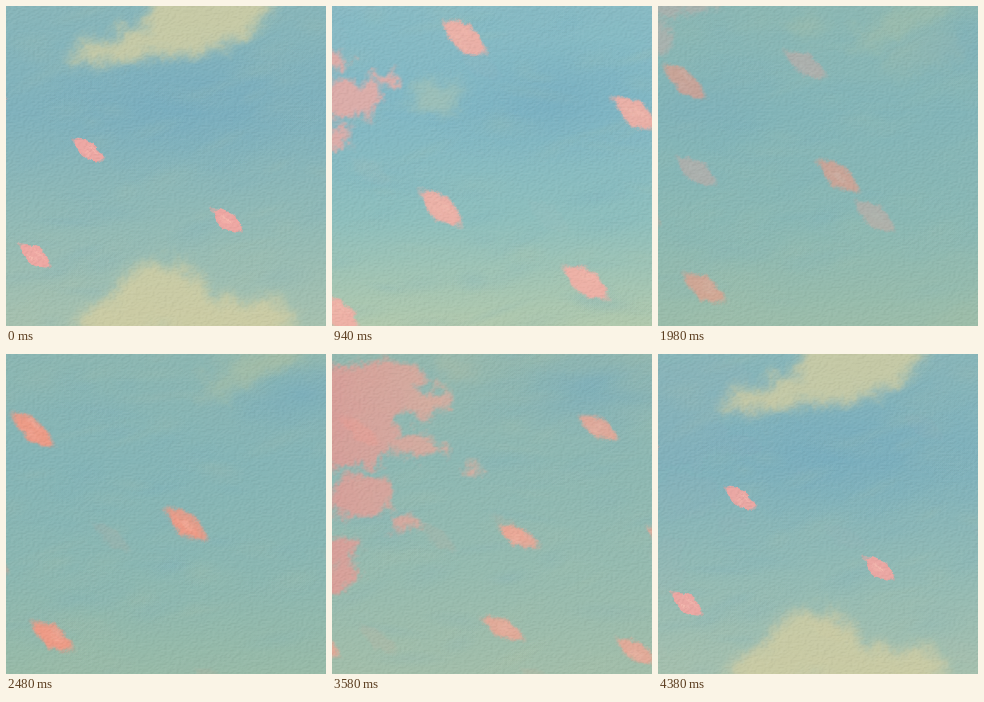
Recreate the animation shown at these times as an HTML page with a canvas. Size 320 by 320 pixels, loop 4440 ms.

```html
<!DOCTYPE html>
<html lang="en">
<head>
<meta charset="utf-8">
<title>Drifting petals</title>
<style>
html, body { margin: 0; width: 100%; height: 100%; overflow: hidden; background: #84b5bd; }
canvas { display: block; width: 100vw; height: 100vh; }
</style>
</head>
<body>
<canvas id="stage" width="320" height="320"></canvas>
<script>
const SIZE = 320, HOLD = 200, STEP = 60, STEPS = 10;
const SEGMENT = HOLD + (STEPS - 1) * STEP;
const BLUE = '#74abc1', CREAM = '#b0c3a6';

// Spots are [x, y, radius], petals are [x, y] centres.
const scenes = [
  {
    sky: ['#88b6ba', '#80b2bd', '#91bab6', '#a6c1af'],
    deep: [185, 92, 75],
    cloud: '#d2cea3',
    puffs: [[200, 4, 36], [172, 32, 20], [128, 39, 16], [90, 50, 13], [155, 284, 25], [118, 312, 24], [195, 312, 26], [250, 314, 22]],
    petal: '#f3a6a2', length: 39, plump: .46, tilt: 35, soft: .7,
    petals: [[82, 144], [221, 214], [28, 249], [-16, 84]]
  },
  {
    sky: ['#88bcc5', '#83b9c6', '#8fc0be', '#b2caae'],
    deep: [220, 95, 65],
    cloud: '#a1c2b7',
    puffs: [[106, 92, 16]],
    blossom: ['#f0aaa4', '#f1b0a9'],
    blots: [[14, 95, 20], [-6, 54, 13], [5, 133, 10], [54, 75, 7]],
    petal: '#f4b0a6', length: 56, plump: .47, tilt: 36, soft: 1.3,
    petals: [[132, 31], [303, 107], [109, 202], [254, 276], [6, 307]]
  },
  {
    sky: ['#8cbab6', '#82b7bb', '#8abab8', '#a3c2ae'],
    deep: [45, 100, 50],
    cloud: '#a9c2a8',
    puffs: [[250, 52, 15], [280, 42, 18], [150, 20, 12], [305, 316, 19]],
    blossom: ['#eda9a3', '#e6afa8'],
    blots: [[4, 1, 14], [42, -5, 15], [-6, 33, 14]],
    petal: '#f3a59e', length: 51, plump: .42, tilt: 35, soft: .9,
    petals: [[147, 58], [38, 165], [217, 210]]
  },
  {
    sky: ['#8cb7b3', '#85b5b8', '#8bb8b3', '#98bba9'],
    deep: [298, 40, 38],
    cloud: '#a3bea9',
    puffs: [[210, 32, 10], [240, 14, 14], [272, 0, 14]],
    petal: '#f49a84', length: 54, plump: .42, tilt: 36, soft: 1.5,
    petals: [[27, 76], [180, 170], [46, 282], [-21, 203]]
  },
  {
    sky: ['#92b7af', '#8cb6b3', '#93b7af', '#9fbba5'],
    deep: [265, 54, 42],
    cloud: '#bec79c',
    puffs: [[222, 0, 12], [262, 0, 17], [305, -2, 18]],
    petal: '#f09b88', length: 49, plump: .36, tilt: 34, soft: 1.7,
    petals: [[28, 77], [178, 175], [106, 183], [46, 285], [208, 327], [336, 211]]
  },
  {
    sky: ['#94b9af', '#8eb9b4', '#96bcb1', '#a3bfab'],
    deep: [262, 32, 52],
    cloud: '#a2bcab',
    puffs: [[125, 14, 14]],
    blossom: ['#ee9893', '#e9ad9d'],
    blots: [[12, 85, 32], [28, 45, 33], [62, 26, 16], [94, 48, 14], [86, 92, 15], [30, 144, 20], [75, 167, 8], [-1, 195, 16], [4, 225, 14], [140, 115, 6]],
    petal: '#efa896', length: 47, plump: .4, tilt: 29, soft: 1.6,
    petals: [[266, 73], [187, 183], [171, 274], [304, 297], [334, 184], [-11, 291]]
  }
];

function seeded(seed) {
  return () => {
    seed = (seed + 0x6D2B79F5) | 0;
    let t = Math.imul(seed ^ (seed >>> 15), 1 | seed);
    t = (t + Math.imul(t ^ (t >>> 7), 61 | t)) ^ t;
    return ((t ^ (t >>> 14)) >>> 0) / 4294967296;
  };
}

const GRID = 256;
const lattice = Float32Array.from({ length: GRID * GRID }, seeded(77));
const cell = (x, y) => lattice[(y & 255) * GRID + (x & 255)];
const mix = (a, b, t) => a + (b - a) * t;
const smooth = t => t * t * (3 - 2 * t);

function noise(x, y) {
  const i = Math.floor(x), j = Math.floor(y), u = smooth(x - i), v = smooth(y - j);
  return mix(mix(cell(i, j), cell(i + 1, j), u), mix(cell(i, j + 1), cell(i + 1, j + 1), u), v) - .5;
}

function sheet() {
  const c = document.createElement('canvas');
  c.width = c.height = SIZE;
  return c.getContext('2d');
}

// Drag pixels along smooth noise for ragged brush edges
function roughen(g, reach, scale) {
  const from = g.getImageData(0, 0, SIZE, SIZE), to = g.createImageData(SIZE, SIZE);
  const src = new Uint32Array(from.data.buffer), out = new Uint32Array(to.data.buffer);
  const clamp = v => Math.max(0, Math.min(SIZE - 1, Math.round(v)));
  for (let y = 0; y < SIZE; y++)
    for (let x = 0; x < SIZE; x++) {
      const u = x / scale, v = y / scale;
      const dx = noise(u, v) + noise(u * 4, v * 4) * .4;
      const dy = noise(u + 90, v) + noise(u * 4, v * 4 + 90) * .4;
      out[y * SIZE + x] = src[clamp(y + dy * reach) * SIZE + clamp(x + dx * reach)];
    }
  g.putImageData(to, 0, 0);
}

function haze(g, color, alpha, x, y, rx, ry, turn = 0) {
  g.save();
  g.translate(x, y);
  g.rotate(turn);
  g.scale(rx, ry);
  const fade = g.createRadialGradient(0, 0, 0, 0, 0, 1);
  fade.addColorStop(0, color);
  fade.addColorStop(.5, color + '80');
  fade.addColorStop(1, color + '00');
  g.globalAlpha = alpha;
  g.fillStyle = fade;
  g.fillRect(-1, -1, 2, 2);
  g.restore();
}

// Joined ovals with soft, ragged borders
function spots(list, fill, blur, reach, scale) {
  const g = sheet();
  g.filter = `blur(${blur}px)`;
  g.fillStyle = fill;
  g.beginPath();
  for (const [x, y, r] of list) {
    g.moveTo(x, y);
    g.ellipse(x, y, r * 1.7, r, -.1, 0, Math.PI * 2);
  }
  g.fill();
  roughen(g, reach, scale);
  return g.canvas;
}

function lens(g, from, to, half) {
  const span = to - from;
  g.beginPath();
  g.moveTo(from, 0);
  g.bezierCurveTo(from + span * .3, -half, from + span * .7, -half, to, 0);
  g.bezierCurveTo(from + span * .75, half, from + span * .35, half, from, 0);
  g.fill();
}

function petals({ petals, petal, length, plump, tilt, soft }, rand) {
  const g = sheet();
  g.filter = `blur(${soft}px)`;
  for (const [x, y] of petals) {
    const half = length * plump * .62;
    g.save();
    g.translate(x, y);
    g.rotate((tilt + rand() * 6 - 3) * Math.PI / 180);
    g.fillStyle = petal;
    g.globalAlpha = .45;
    lens(g, -length * .54, length * .54, half * .8);
    g.globalAlpha = .9;
    lens(g, -length * .44, length * .44, half);
    g.fillStyle = '#fbc4b6';
    g.globalAlpha = .3;
    for (let i = 0; i < 5; i++) {
      g.save();
      g.translate((rand() - .5) * length * .3, (rand() - .5) * half);
      lens(g, -length * .16, length * .16, 1.2);
      g.restore();
    }
    g.restore();
  }
  roughen(g, 4, 6);
  return g.canvas;
}

// Embossed paper
function makeGrain() {
  const g = sheet(), img = g.createImageData(SIZE, SIZE);
  const height = (x, y) => noise(x / 2.4, y / 1.7);
  for (let y = 0; y < SIZE; y++)
    for (let x = 0; x < SIZE; x++) {
      const d = height(x, y) - height(x + 1, y + 1), k = (y * SIZE + x) * 4;
      img.data.fill(d > 0 ? 255 : 40, k, k + 3);
      img.data[k + 3] = Math.min(12, Math.abs(d) * 22);
    }
  g.putImageData(img, 0, 0);
  return g.canvas;
}

function paint(scene, index) {
  const g = sheet(), rand = seeded(index * 31 + 5);
  const sky = g.createLinearGradient(0, 0, 0, SIZE);
  scene.sky.forEach((color, i, all) => sky.addColorStop(i / (all.length - 1), color));
  g.fillStyle = sky;
  g.fillRect(0, 0, SIZE, SIZE);

  const [x, y, r] = scene.deep;
  haze(g, BLUE, .6, x, y, r * 2, r, -.1);
  for (let i = 0; i < 90; i++)
    haze(g, i % 2 ? BLUE : CREAM, .1, rand() * SIZE, rand() * SIZE, 15 + rand() * 40, 5 + rand() * 12, -.5 + rand() * .7);

  g.globalAlpha = .85;
  g.drawImage(spots(scene.puffs, scene.cloud, 7, 14, 16), 0, 0);
  if (scene.blots) {
    const blush = g.createLinearGradient(0, 0, 120, 0);
    scene.blossom.forEach((color, i) => blush.addColorStop(i, color));
    g.drawImage(spots(scene.blots, blush, 3, 16, 13), 0, 0);
  }
  g.globalAlpha = 1;
  g.drawImage(petals(scene, rand), 0, 0);
  g.drawImage(grain, 0, 0);
  return g.canvas;
}

const grain = makeGrain();
const paintings = scenes.map(paint);
const stage = document.getElementById('stage').getContext('2d');
const start = performance.now();

function render(ms) {
  const t = ms % (SEGMENT * paintings.length);
  const index = Math.floor(t / SEGMENT), local = t % SEGMENT;
  const step = local < HOLD ? 0 : Math.floor((local - HOLD) / STEP) + 1;
  stage.globalAlpha = 1;
  stage.drawImage(paintings[index], 0, 0);
  stage.globalAlpha = smooth(step / STEPS);
  stage.drawImage(paintings[(index + 1) % paintings.length], 0, 0);
}

function tick() {
  render(performance.now() - start);
  requestAnimationFrame(tick);
}
tick();
</script>
</body>
</html>
```
